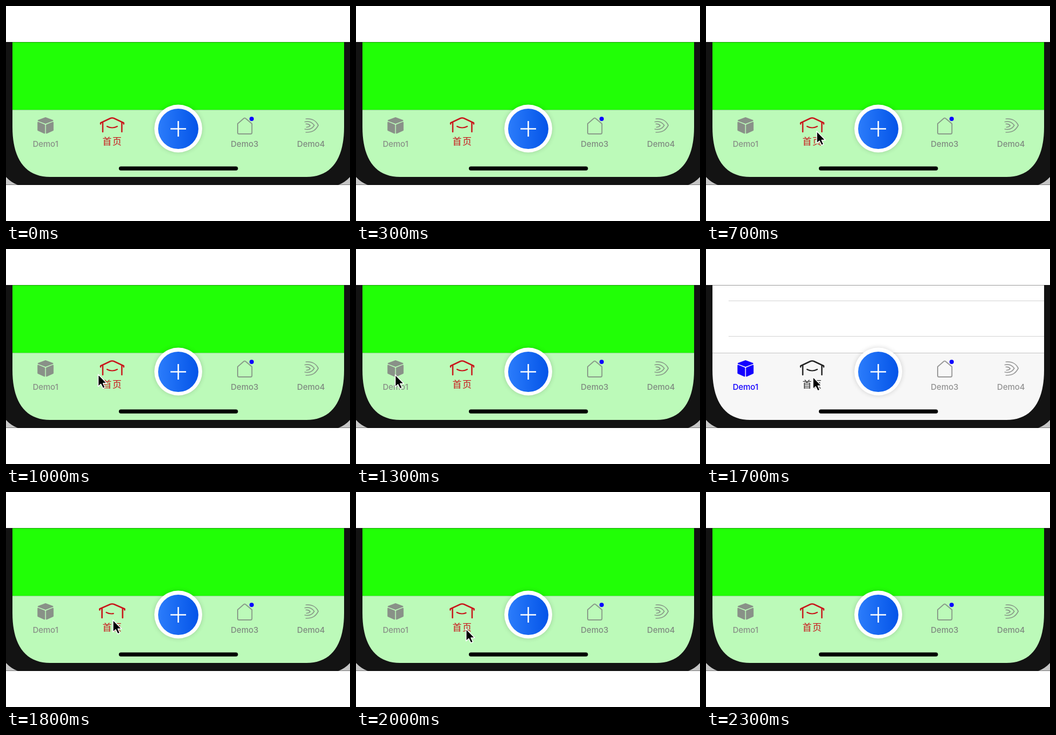
These frames come from a looping animation (640 px wide and 400 px high, 2.4 s). An HTML page:

```html
<!DOCTYPE html>
<html lang="en">
<head>
<meta charset="utf-8">
<style>
html, body { margin: 0; width: 100%; height: 100%; overflow: hidden; background: #fff; }
svg { display: block; width: 640px; height: 400px; --page: #21ff06; --bar: #bcfab9; --edge: #86d685; --cube: #899188; --home: #c9161b; --idle: #7f8a80; --icon: #899b89; }
svg.list { --page: #fff; --bar: #f7f7f7; --edge: #c3c3c3; --cube: #1400ff; --home: #232323; --idle: #929292; --icon: #999; }
text { font: 500 15px Inter, Roboto, sans-serif; text-anchor: middle; fill: var(--idle); }
.line { fill: none; stroke-linecap: round; stroke-linejoin: round; }
#rows { display: none; }
.list #rows { display: block; }
</style>
</head>
<body>
<svg id="stage" viewBox="0 0 640 400">
  <defs>
    <clipPath id="view"><path d="M0 67H640V333H0Z"/></clipPath>
    <clipPath id="screen"><path d="M12 67V225C12 285 36 318 82 318H559C605 318 629 285 629 225V67Z"/></clipPath>
    <linearGradient id="blue"><stop stop-color="#2b7cfb"/><stop offset="1" stop-color="#0454e8"/></linearGradient>
    <filter id="soft" x="-30%" y="-30%" width="160%" height="160%"><feGaussianBlur stdDeviation="4"/></filter>
  </defs>
  <g clip-path="url(#view)">
    <path fill="#c6c6c6" d="M0 67H640V333H0Z"/>
    <path fill="#131313" d="M0 67V318Q9 328 22 333H618Q631 328 640 318V67Z"/>
    <g clip-path="url(#screen)">
      <path fill="var(--page)" d="M12 67H629V194H12Z"/>
      <path id="rows" stroke="#d2d2d2" d="M42 96.5H629M42 162.5H629"/>
      <path fill="var(--bar)" d="M12 193H629V318H12Z"/>
      <path stroke="var(--edge)" d="M12 193.5H629"/>
    </g>
    <path stroke="#000" stroke-opacity=".4" d="M0 67.5H640M0 332.5H640"/>

    <g fill="var(--cube)" stroke="var(--cube)" stroke-width="2" stroke-linejoin="round">
      <path d="M73.5 208L87 213L73.5 218L60 213Z"/>
      <path d="M59.5 216.5L71.7 221.5V236.5L59.5 231Z"/>
      <path d="M87.5 216.5L75.3 221.5V236.5L87.5 231Z"/>
    </g>
    <text x="73.5" y="262" style="fill:var(--cube)">Demo1</text>

    <g class="line" stroke="var(--home)" stroke-width="2.5">
      <path id="roof" d="M176 219.5V217.5L194 209Q197.500 207.500 201 209L219 217.500V219.500M180 217V234M215.500 217V234"/>
      <path id="smile" pathLength="1" stroke-width="2.200" d="M188 224Q197.500 229 207 224"/>
    </g>
    <text x="198" y="257.500" style="font:500 17px 'Noto Sans CJK SC','Noto Sans CJK',sans-serif;letter-spacing:1.500px;fill:var(--home)">首页</text>

    <circle cx="320.500" cy="228" r="45" opacity=".14" filter="url(#soft)"/>
    <circle cx="320.500" cy="228" r="44.500" fill="#fff"/>
    <circle cx="320.500" cy="228.500" r="37.500" fill="url(#blue)"/>
    <path stroke="#fff" stroke-width="2.600" d="M306 228.500H335M320.500 214V243"/>

    <g class="line" stroke="var(--icon)" stroke-width="2">
      <path d="M431 219L442.500 209Q444 208 445.500 209L457.500 219V235.500Q457.500 238 455 238H433.500Q431 238 431 235.500Z"/>
      <path stroke-width="1.700" d="M558 210C571 209 577 214 581 222C576 231 571 235 558 235M556 215.500C565 213 570 217 573.500 222C570 228 565 231 556 229M558 219.500C562 219 564 220 566 222.500C564 225 562 225.500 559 225.500"/>
    </g>
    <circle cx="457" cy="210" r="4" fill="#0c00ff"/>
    <text x="444" y="262">Demo3</text>
    <text x="567.500" y="262">Demo4</text>
    <rect x="210" y="298.500" width="221.500" height="7.500" rx="3.750"/>
    <path id="cursor" stroke="#fff" stroke-width="1.500" stroke-linejoin="round" d="M0 0V22.500L5 18L9 26L12.800 24.300L9.200 16.500H16Z"/>
  </g>
</svg>
<script>
const $ = id => document.getElementById(id);
const stage = $('stage'), cursor = $('cursor'), roof = $('roof'), smile = $('smile');
const loop = 2400, step = 100;

// Pointer tip: time, x, y
const path = [
  [0, 236, 345], [300, 236, 345], [700, 206, 233], [900, 206, 233],
  [1200, 73, 234], [1400, 73, 234], [1700, 199, 238], [1900, 199, 238],
  [2300, 236, 345], [2400, 236, 345]
];

function pointAt(t) {
  const i = path.findIndex(p => p[0] > t);
  const [t0, x0, y0] = path[i - 1], [t1, x1, y1] = path[i];
  const u = (t - t0) / (t1 - t0), k = u * u * (3 - 2 * u);
  return [x0 + (x1 - x0) * k, y0 + (y1 - y0) * k];
}

function draw(now) {
  const t = Math.floor(now % loop / step) * step;
  stage.classList.toggle('list', t >= 1400 && t < 1800);
  cursor.setAttribute('transform', `translate(${pointAt(t)})`);

  // The selected house springs back while its smile is drawn
  const u = t < 1800 ? 1 : Math.min(1, (t - 1800) / 300);
  const sx = 1 + 0.08 * (1 - u);
  roof.setAttribute('transform', `translate(${197.5 * (1 - sx)} 0) scale(${sx} 1)`);
  smile.setAttribute('transform', `translate(${-1.5 * (1 - u)} 0)`);
  smile.setAttribute('stroke-dasharray', `${0.7 + 0.3 * u} 2`);
  requestAnimationFrame(draw);
}
requestAnimationFrame(draw);
</script>
</body>
</html>
```
